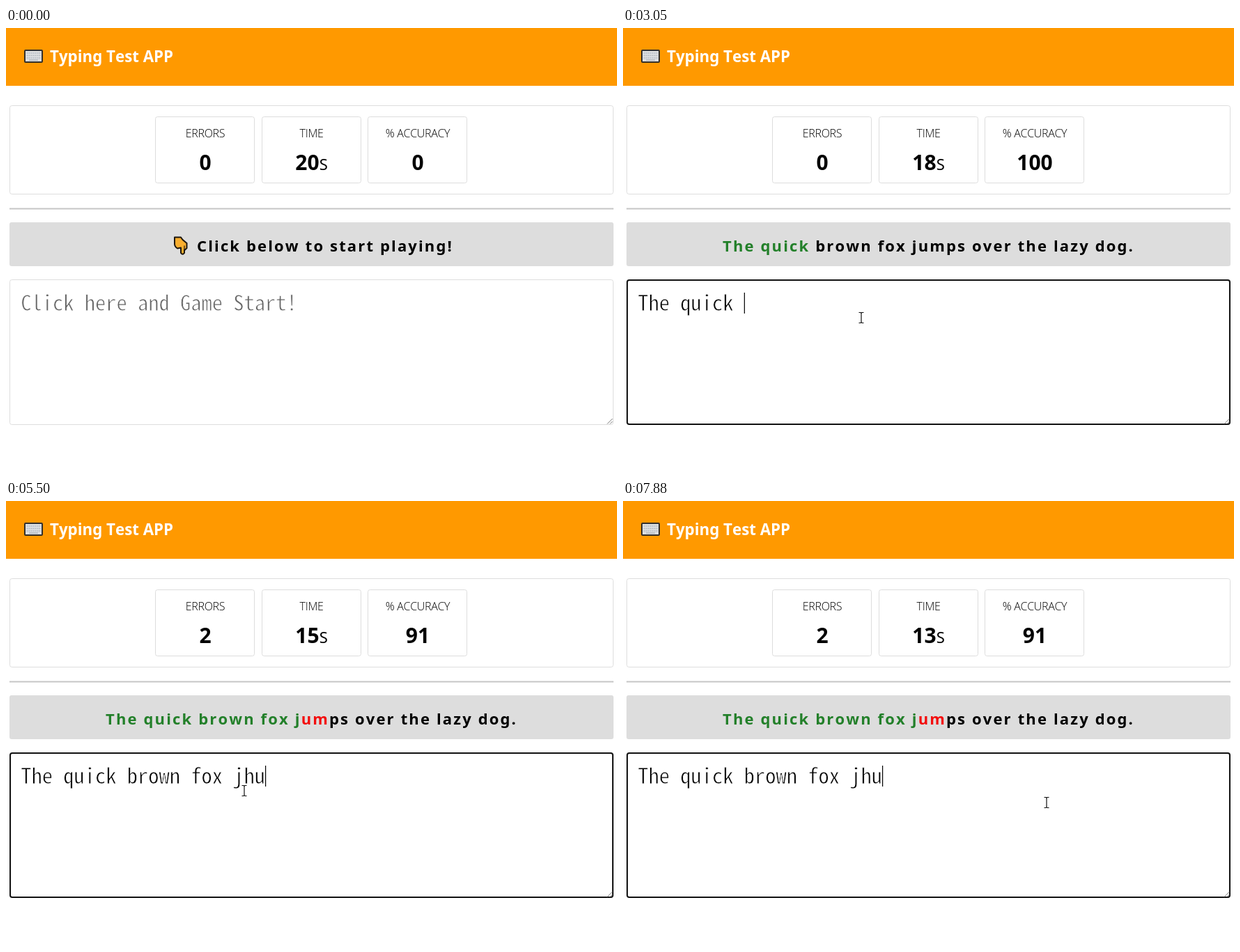
An HTML page that plays this animation: 877 px wide and 639 px high, repeating every 8000 ms.

```html
<!DOCTYPE html>
<html lang="en">
<head>
<meta charset="utf-8">
<title>Typing Test</title>
<style>
  html, body { margin: 0; width: 100%; height: 100%; overflow: hidden; background: #fff; }
  svg { display: block; width: 100vw; height: 100vh; }
  text { font-family: "Noto Sans", "Open Sans", sans-serif; font-kerning: none; white-space: pre; }
  .title { font-size: 22.3px; font-weight: 700; fill: #fff; }
  .label { font-family: "Open Sans", "Noto Sans", sans-serif; font-size: 16px; font-weight: 300; letter-spacing: -.3px; text-anchor: middle; }
  .num { font-size: 30px; font-weight: 700; text-anchor: middle; }
  .unit { font-size: 22px; font-weight: 400; }
  .quote { font-size: 22px; font-weight: 700; letter-spacing: 2.15px; }
  /* the white outline thins the strokes */
  .mono {
    font-family: "Noto Sans Mono CJK KR", "Noto Sans CJK KR", "Noto Sans Mono", monospace;
    font-feature-settings: "hwid"; font-size: 30.5px; text-anchor: middle;
    stroke: #fff; stroke-width: .8px;
  }
  .box { fill: #fff; stroke: #ddd; }
</style>
</head>
<body>
<svg viewBox="0 0 877 639">
  <rect width="877" height="639" fill="#fff"/>
  <rect width="877" height="83" fill="#ff9900"/>
  <g>
    <rect x="27" y="32" width="25" height="17" rx="1" fill="#dcdfe2" stroke="#33302c" stroke-width="2"/>
    <path d="M29.5 36h20M29.5 39.5h20M29.5 43h20" stroke="#b4bac1" stroke-width="1.6" stroke-dasharray="2 1"/>
    <path d="M33 46h13" stroke="#b4bac1" stroke-width="1.6"/>
  </g>
  <text class="title" x="63" y="49">Typing Test APP</text>

  <rect class="box" x="5.5" y="111.5" width="866" height="127" rx="3"/>
  <g id="cards"></g>
  <rect x="5" y="258.5" width="867" height="2" fill="#c6c6c6"/>
  <rect x="5" y="279" width="867" height="63" rx="3" fill="#ddd"/>

  <g id="intro">
    <path d="M242 300.5H251L253.5 304L259.5 309V316L257 318.5H256V323Q253.5 326.5 251 323V315.5L246 316.5Q242 314 242 310Z"
      fill="#f9ae2f" stroke="#1d1710" stroke-width="2" stroke-linejoin="round"/>
    <path d="M256 318V312.5" stroke="#1d1710" stroke-width="1.2"/>
    <text class="quote" x="274" y="320.5">Click below to start playing!</text>
  </g>
  <text id="quote" class="quote" x="143" y="320.5"><tspan id="head" fill="#23802a"></tspan><tspan id="wrong" fill="#f30d0d"></tspan><tspan id="rest"></tspan></text>

  <rect id="area" fill="#fff" rx="3"/>
  <path d="M863 568.5l7.5-7.5M867 568.5l3.5-3.5" stroke="#777" fill="none"/>
  <text id="hint" class="mono" y="405.5" fill="#666"></text>
  <text id="typed" class="mono" y="405.5"></text>
  <rect id="caret" y="380" width="1.2" height="30"/>

  <g id="mouse">
    <circle id="halo" r="11.5" fill="#f2ee58" opacity=".88"/>
    <path id="beam" d="M-3.5-7.5h2.5l1 1 1-1h2.5M0-6.5v13M-3.5 7.5h2.5l1-1 1 1h2.5" fill="none" stroke="#111" stroke-width="1.2"/>
    <path id="arrow" d="M.5 0v14.5l3.3-3.2 2.3 5.5 2.3-1-2.3-5.3h4.6z" fill="#fff" stroke="#111"/>
  </g>
</svg>
<script>
const LOOP = 8000, CELL = 15.25, LEFT = 21.25, BLINK = 530;
const QUOTE = "The quick brown fox jumps over the lazy dog.";
const ENTRY = "The quick brown fox jhu";
const KEYS = [1200, 1330, 1400, 1530, 1860, 2130, 2190, 2520, 2660, 3050, 3190, 3390,
  3520, 3650, 3850, 4240, 4440, 4570, 4710, 5040, 5300, 5300, 5500];
const START = 330, BLUR = 6560, REFOCUS = 7820;
const CLICKS = [[270, 400], [BLUR, 6690], [REFOCUS, 7880]];
// time, x, y
const PATH = [[70, 352, 428], [270, 342, 416], [6230, 342, 416], [6560, 289, 331],
  [6690, 289, 331], [7090, 560, 404], [7300, 560, 404], [7550, 608, 433]];

const $ = id => document.getElementById(id);
const show = (id, on) => $(id).setAttribute("display", on ? "inline" : "none");
const set = (id, attrs) => { for (const k in attrs) $(id).setAttribute(k, attrs[k]); };

function put(id, text) {
  if ($(id).textContent !== text) $(id).textContent = text;
}

function cells(id, text) {
  put(id, text);
  $(id).setAttribute("x", [...text].map((_, i) => LEFT + CELL * (i + 0.5)).join(" "));
}

function buildCards() {
  const cards = [["ERRORS", "errors", ""], ["TIME", "time", "S"], ["% ACCURACY", "accuracy", ""]];
  $("cards").innerHTML = cards.map(([label, id, unit], i) => {
    const x = 214.5 + 152.5 * i, mid = x + 71.5;
    return `<rect class="box" x="${Math.floor(x) + 0.5}" y="127.5" width="142" height="95" rx="3"/>
      <text class="label" x="${mid}" y="156.5">${label}</text>
      <text class="num" x="${mid}" y="203.5"><tspan id="${id}"></tspan><tspan class="unit">${unit}</tspan></text>`;
  }).join("");
}

function mouseAt(t) {
  let from = PATH[0];
  for (const to of PATH) {
    if (t < to[0]) {
      const p = Math.max(0, (t - from[0]) / (to[0] - from[0]));
      const e = p * p * (3 - 2 * p);
      return [from[1] + (to[1] - from[1]) * e, from[2] + (to[2] - from[2]) * e];
    }
    from = to;
  }
  return [from[1], from[2]];
}

function drawMouse(t) {
  const [x, y] = mouseAt(t), overArea = y > 361;
  show("mouse", t >= PATH[0][0]);
  set("mouse", { transform: `translate(${x} ${y})` });
  show("beam", overArea);
  show("arrow", !overArea);
  show("halo", CLICKS.some(([a, b]) => t >= a && t < b));
}

function drawStats(t, n, errors) {
  const ticks = Math.max(0, Math.floor((t - START) / 994));
  put("errors", String(errors));
  put("time", String(20 - ticks));
  put("accuracy", String(n ? Math.round((n - errors) / n * 100) : 0));
}

function drawArea(t, n) {
  const focus = t >= START && t < BLUR || t >= REFOCUS;
  set("area", focus
    ? { x: 6, y: 362, width: 865, height: 207, stroke: "#111", "stroke-width": 2 }
    : { x: 5.5, y: 361.5, width: 866, height: 208, stroke: "#ddd", "stroke-width": 1 });
  show("hint", t < START);
  cells("typed", ENTRY.slice(0, n));
  const since = t - (t >= REFOCUS ? REFOCUS : n ? KEYS[n - 1] : START);
  show("caret", focus && since % (2 * BLINK) < BLINK);
  set("caret", { x: LEFT + CELL * n });
}

function draw(t) {
  const n = KEYS.filter(k => k <= t).length;
  let good = 0;
  while (good < n && ENTRY[good] === QUOTE[good]) good++;
  show("intro", t < START);
  show("quote", t >= START);
  put("head", QUOTE.slice(0, good));
  put("wrong", QUOTE.slice(good, n));
  put("rest", QUOTE.slice(n));
  drawStats(t, n, n - good);
  drawArea(t, n);
  drawMouse(t);
}

buildCards();
cells("hint", "Click here and Game Start!");
const begin = performance.now();
function frame() {
  draw((performance.now() - begin) % LOOP);
  requestAnimationFrame(frame);
}
draw(0);
requestAnimationFrame(frame);
</script>
</body>
</html>
```
